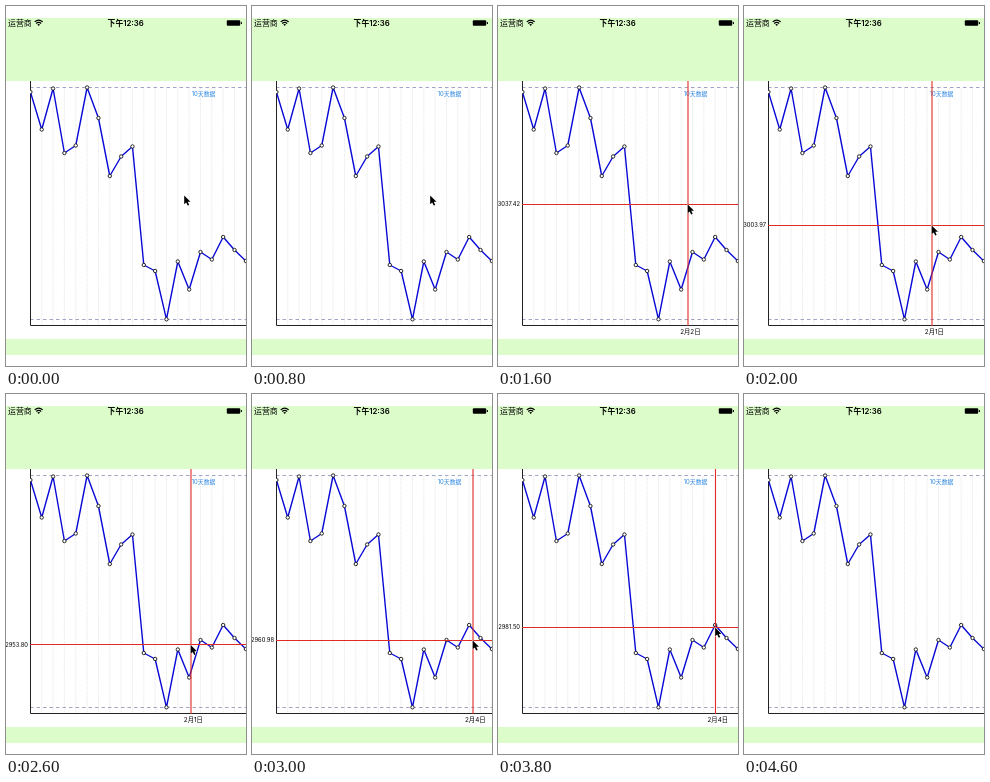
Write an HTML page that moves like this. It is 240 px wide and 360 px high and loops after 4800 ms.

```html
<!DOCTYPE html>
<html lang="zh">
<head>
<meta charset="utf-8">
<style>
html, body { margin: 0; width: 100%; height: 100%; overflow: hidden; background: #fff; }
svg { display: block; width: 240px; height: 360px; }
text { font-family: Inter, "Noto Sans CJK SC", "Noto Sans CJK", sans-serif; }
</style>
</head>
<body>
<svg viewBox="0 0 240 360">
  <defs><clipPath id="plot"><rect x="24" y="75" width="216" height="246"/></clipPath></defs>
  <rect width="240" height="360" fill="#fff"/>
  <path d="M0 12H240V75H0ZM0 333H240V349H0Z" fill="#dcfdc9"/>

  <text x="2" y="19.8" font-size="7.9">运营商</text>
  <g fill="none" stroke="#000" stroke-width="1.25">
    <path d="M28.7 15.9Q32.7 12.3 36.7 15.9"/>
    <path d="M30.2 17.5Q32.7 15.3 35.2 17.5"/>
  </g>
  <path d="M31.3 18.5Q32.7 17.4 34.1 18.5L32.7 20Z"/>
  <text x="119.7" y="19.7" font-size="7.8" font-weight="600" text-anchor="middle">下午12:36</text>
  <rect x="220.8" y="14.2" width="13.4" height="5.6" rx="1"/>
  <rect x="234.8" y="16" width="1.2" height="2" rx=".5"/>

  <g id="grid" stroke="#e4e4e4" stroke-width=".8" stroke-dasharray="1.5 1"></g>
  <path d="M24 81.5H240M24 313.5H240" stroke="#a0a6c4" stroke-dasharray="3.5 3"/>
  <path d="M24.5 75V319.5H240" fill="none" stroke="#222"/>
  <text x="185.7" y="89.7" font-size="5.9" fill="#2a86e0">10天数据</text>
  <g clip-path="url(#plot)">
    <polyline id="line" fill="none" stroke="#0808d6" stroke-width="1.4" stroke-linejoin="round"/>
    <g id="dots" fill="#fff" stroke="#111" stroke-width=".9"></g>
  </g>

  <g id="cross">
    <path id="lines" stroke="#e02c24" stroke-width="1.1"/>
    <text id="value" x="22" font-size="5.8" text-anchor="end"></text>
    <text id="date" y="328.2" font-size="6.3" text-anchor="middle"></text>
  </g>
  <path id="cursor" d="M0 0V8.8L2 7L3.5 10.2L5 9.5L3.6 6.4H6.3Z" stroke="#fff" stroke-width=".8" paint-order="stroke"/>
</svg>
<script>
const LOOP = 4800, STEP = 200, LEFT = 24.4, GAP = 11.34;
const SHOW = 1200, HIDE = 4200, CURSOR_END = 4400;
const $ = id => document.getElementById(id);

function add(parent, name, attrs) {
  const node = document.createElementNS("http://www.w3.org/2000/svg", name);
  for (const key in attrs) node.setAttribute(key, attrs[key]);
  parent.append(node);
}

// the charted series, as heights on the stage
const points = [86, 123.5, 82.5, 147, 139.5, 81.5, 112, 170, 150.5, 140.5,
                259, 265, 313.3, 255.5, 283.5, 246, 253.5, 231, 244, 255]
  .map((y, i) => [LEFT + i * GAP, y]);

$("line").setAttribute("points", points.join(" "));
points.forEach(([x, y], i) => {
  if (i) add($("grid"), "path", { d: `M${x} 82V319` });
  add($("dots"), "circle", { cx: x, cy: y, r: 1.7 });
});

const valueAt = y => 3037.42 - (y - 198) * 1.593;

// stops of the drag
const stops = [
  { t: SHOW, x: 178.5, y: 189 },
  { t: 1600, x: 190, y: 198 },
  { t: 2600, x: 185, y: 250.49 },
  { t: 3000, x: 221, y: 245.985 },
  { t: 3800, x: 217.5, y: 233.104 }
];

function dragAt(t) {
  const i = stops.findIndex(s => s.t > t);
  if (i < 0) return stops[stops.length - 1];
  if (i === 0) return stops[0];
  const a = stops[i - 1], b = stops[i];
  const u = (t - a.t) / (b.t - a.t);
  const mix = key => a[key] + (b[key] - a[key]) * u;
  return { x: mix("x"), y: mix("y") };
}

function dayLabel(x) {
  const day = Math.round((x - LEFT) / GAP) - 13;
  return day > 0 ? `2月${day}日` : `1月${31 + day}日`;
}

const show = (id, on) => $(id).setAttribute("visibility", on ? "visible" : "hidden");

function draw(ms) {
  const t = Math.floor(ms % LOOP / STEP) * STEP;
  const { x, y } = dragAt(t);
  const row = Math.floor(y + .05) + .5;

  show("cross", t >= SHOW && t < HIDE);
  show("cursor", t < CURSOR_END);
  $("lines").setAttribute("d", `M24 ${row}H240M${x} 75V320`);
  $("value").setAttribute("y", y + 2.1);
  $("value").textContent = valueAt(y).toFixed(2);
  $("date").setAttribute("x", x + 2.3);
  $("date").textContent = dayLabel(x);
  $("cursor").setAttribute("transform", `translate(${x - .3} ${y + .4})`);
}

const start = performance.now();
function frame() {
  draw(performance.now() - start);
  requestAnimationFrame(frame);
}
frame();
</script>
</body>
</html>
```
